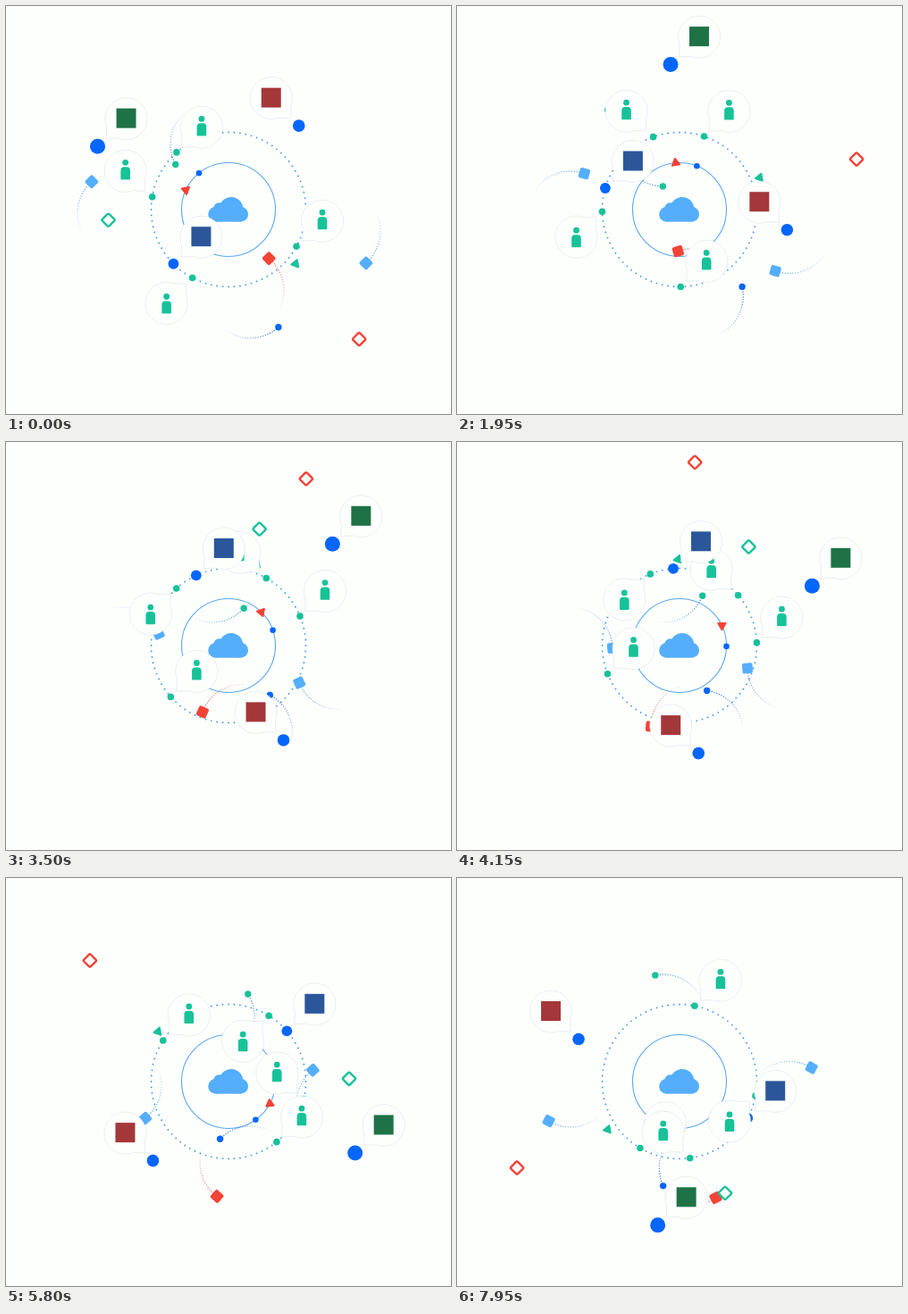
Animation, 498 px wide and 457 px high, one loop 8 s. Source, as an HTML page with a canvas:

```html
<!DOCTYPE html>
<html lang="en">
<head>
<meta charset="utf-8">
<title>Cloud orbits</title>
<style>
html, body { margin: 0; width: 100%; height: 100%; overflow: hidden; background: #fdfffd; }
canvas { display: block; }
</style>
</head>
<body>
<canvas id="stage" width="498" height="457"></canvas>
<script>
const ctx = document.getElementById('stage').getContext('2d');
const BG = '#fdfffd', BLUE = '#0566fb', SKY = '#54aefb', GREEN = '#17c299', RED = '#f24336';
const LOOP = 8000, STEP = 50, TAU = 2 * Math.PI;
const CENTER = [249, 228];
const rad = deg => deg * Math.PI / 180;

// Shared rotation clock: [ms, degrees]
const CLOCK = [[0, 0], [1950, 60.7], [2850, 89.7], [4150, 130], [4950, 156.1], [6650, 211.2], [7950, 252.8]];

function turnAt(ms) {
  const next = CLOCK.findIndex(key => key[0] > ms);
  const i = next < 0 ? CLOCK.length - 1 : next;
  const [t0, a0] = CLOCK[i - 1], [t1, a1] = CLOCK[i];
  return a0 + (a1 - a0) * (ms - t0) / (t1 - t0);
}

// Small circles whose heads drag a dotted tail
const trails = [
  { center: [127, 232], start: 228.5, dir: 1, color: SKY, tail: '#4a90d2', square: true },
  { center: [372, 252.5], start: 48.9, dir: 1, color: SKY, tail: '#4a90d2', square: true },
  { center: [264, 318.7], start: -50, dir: -1, color: RED, tail: '#e8505a', square: true },
  { center: [273.3, 325], start: 47.8, dir: -1, color: BLUE, tail: '#1c5fd2' },
  { center: [231, 155], start: 151.5, dir: -1, color: GREEN, tail: '#2a80c0' }
];

// Dots on the large orbits; the bubble sits at (dx, dy) from its dot
const carriers = [
  { orbit: 86.5, start: 227.8, dot: 3.8, dx: 28, dy: -28 },
  { orbit: 86.5, start: 189.4, dot: 3.8, dx: -30, dy: -29 },
  { orbit: 86.5, start: 28.5, dot: 3.8, dx: 29, dy: -28.5 },
  { orbit: 86.5, start: 117.8, dot: 3.8, dx: -29, dy: 28.5 },
  { orbit: 122.5, start: -50, dot: 6.8, dx: -31, dy: -31, app: '#a4373a' },
  { orbit: 162.7, start: 205.8, dot: 8.5, dx: 32, dy: -31, app: '#1f7246' },
  { orbit: 86.5, start: 135.4, dot: 5.9, dx: 31, dy: -30, app: '#2b579a' }
];

function polar([x, y], radius, deg) {
  return [x + radius * Math.cos(rad(deg)), y + radius * Math.sin(rad(deg))];
}

function disc([x, y], radius, color) {
  ctx.fillStyle = color;
  ctx.beginPath();
  ctx.arc(x, y, radius, 0, TAU);
  ctx.fill();
}

function placed([x, y], deg, draw) {
  ctx.save();
  ctx.translate(x, y);
  ctx.rotate(rad(deg));
  draw();
  ctx.restore();
}

function roundRect(x, y, w, h, radii) {
  ctx.beginPath();
  ctx.roundRect(x, y, w, h, radii);
}

function square(at, deg, color) {
  placed(at, deg, () => {
    ctx.fillStyle = color;
    roundRect(-5.8, -5.8, 11.6, 11.6, 2);
    ctx.fill();
  });
}

function hollowDiamond(at, color) {
  placed(at, 45, () => {
    ctx.fillStyle = BG;
    ctx.strokeStyle = color;
    ctx.lineWidth = 2.4;
    roundRect(-5.4, -5.4, 10.8, 10.8, 1.6);
    ctx.fill();
    ctx.stroke();
  });
}

function triangle(at, deg, color) {
  placed(at, deg, () => {
    ctx.fillStyle = ctx.strokeStyle = color;
    ctx.lineWidth = 2;
    ctx.lineJoin = 'round';
    ctx.beginPath();
    for (const corner of [0, 120, 240]) ctx.lineTo(...polar([0, 0], 4.8, corner));
    ctx.closePath();
    ctx.fill();
    ctx.stroke();
  });
}

function rings() {
  for (let i = 0; i < 84; i++) disc(polar(CENTER, 86.5, i * 360 / 84), 0.95, '#4b9bea');
  ctx.strokeStyle = '#5ba8ee';
  ctx.lineWidth = 1.1;
  ctx.beginPath();
  ctx.arc(...CENTER, 52.5, 0, TAU);
  ctx.stroke();
}

function cloud() {
  disc([252, 227.2], 13.2, SKY);
  disc([238.7, 226.5], 6.3, SKY);
  disc([234.5, 233.4], 8.3, SKY);
  disc([262.5, 233.2], 8.5, SKY);
  ctx.fillRect(234.5, 227, 28, 14.7);
}

function trail({ center, start, dir, color, tail, square: isSquare }, turn) {
  const angle = start + dir * turn, count = 23;
  for (let i = 1; i < count; i++) {
    ctx.globalAlpha = 0.95 * (1 - i / count);
    disc(polar(center, 47, angle - dir * i * 3.5), 0.75, tail);
  }
  ctx.globalAlpha = 1;
  const head = polar(center, 47, angle);
  if (isSquare) square(head, 45 + dir * turn, color);
  else disc(head, 3.7, color);
}

function person() {
  disc([0, -9.5], 3.4, GREEN);
  roundRect(-5.3, -4.6, 10.6, 14.2, [4, 4, 0.8, 0.8]);
  ctx.fill();
}

function bubble({ dx, dy, app }, [x, y]) {
  placed([x + dx, y + dy], 0, () => {
    ctx.save();
    ctx.scale(-Math.sign(dx), -Math.sign(dy));
    ctx.beginPath();
    ctx.arc(0, 0, 23.5, rad(68), rad(382));
    ctx.lineTo(22.5, 22.5);
    ctx.closePath();
    ctx.fillStyle = BG;
    ctx.fill();
    ctx.strokeStyle = '#d9dee6';
    ctx.lineWidth = 0.9;
    ctx.setLineDash([1.5, 1]);
    ctx.stroke();
    ctx.restore();
    if (app) {
      ctx.fillStyle = app;
      ctx.fillRect(-11, -11.5, 22, 22);
    } else {
      // An upward tail pushes the figure down a little
      if (dy > 0) ctx.translate(0, 2);
      person();
    }
  });
}

function render(ms) {
  const turn = turnAt(ms);
  ctx.fillStyle = BG;
  ctx.fillRect(0, 0, 498, 457);
  rings();
  cloud();
  for (const item of trails) trail(item, turn);
  disc(polar(CENTER, 52.5, 231 + turn), 3.3, BLUE);
  triangle(polar(CENTER, 52.5, 204.6 + turn), turn - 40, RED);
  triangle(polar(CENTER, 96.6, 39 - turn), 50, GREEN);
  hollowDiamond(polar(CENTER, 135, 175 + turn), GREEN);
  hollowDiamond(polar(CENTER, 206, 44.8 - turn), RED);

  const spots = carriers.map(c => polar(CENTER, c.orbit, c.start + turn));
  carriers.forEach((c, i) => disc(spots[i], c.dot, c.app ? BLUE : GREEN));
  carriers.forEach((c, i) => bubble(c, spots[i]));
}

const began = performance.now();
function tick() {
  const elapsed = (performance.now() - began) % LOOP;
  render(Math.floor(elapsed / STEP) * STEP);
  requestAnimationFrame(tick);
}
tick();
</script>
</body>
</html>
```
